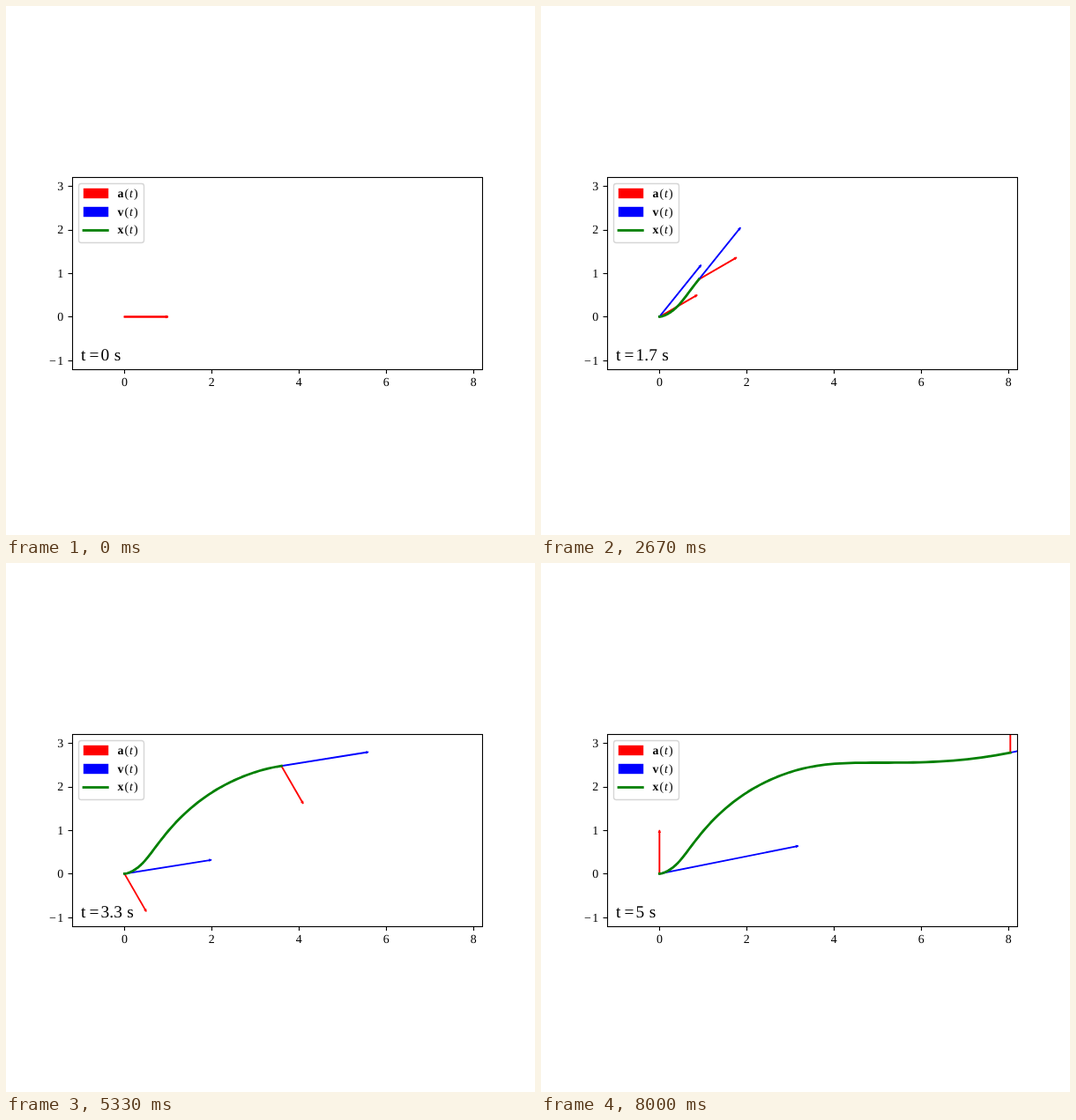
Write an HTML page that moves like this. It is 600 px wide and 600 px high and loops after 8080 ms.

```html
<!DOCTYPE html>
<html lang="en">
<head>
<meta charset="utf-8">
<title>Acceleration, velocity, position</title>
<style>
  html, body { margin: 0; width: 100%; height: 100%; overflow: hidden; background: #fff; }
  svg { display: block; width: 100vw; height: 100vh; }
  text { font: 13.9px "Liberation Serif", serif; text-rendering: geometricPrecision; }
  #clock { font-size: 19.4px; }
  .axis { fill: none; stroke: #000; stroke-width: 1.11; }
  .a, .v { stroke-width: 1.39; stroke-miterlimit: 2; }
  .a { fill: red; stroke: red; }
  .v { fill: blue; stroke: blue; }
  .x { fill: none; stroke: green; stroke-width: 2.78; stroke-linecap: square; stroke-linejoin: round; }
  .end { text-anchor: end; }
  .mid { text-anchor: middle; }
  .b { font-weight: bold; }
  .i { font-style: italic; }
</style>
</head>
<body>
<svg viewBox="0 0 600 600">
  <clipPath id="area"><rect x="75" y="194.17" width="465" height="217.66"/></clipPath>
  <g clip-path="url(#area)">
    <path id="a0" class="a"/><path id="v0" class="v"/>
    <path id="a1" class="a"/><path id="v1" class="v"/>
    <path id="trail" class="x"/>
  </g>
  <g id="axes"><rect class="axis" x="75.5" y="194.5" width="465" height="218"/></g>
  <text id="clock" y="401.9"><tspan x="85">t</tspan><tspan x="94.6">=</tspan><tspan id="secs" x="107.6">0</tspan><tspan dx="5.5">s</tspan></text>
  <g id="legend">
    <rect x="82.5" y="201.5" width="74" height="67" rx="2.78" fill="#fff" fill-opacity=".8" stroke="#ccc" stroke-opacity=".8" stroke-width="1.39"/>
    <rect class="a" x="88.5" y="207.5" width="27" height="10"/>
    <rect class="v" x="88.5" y="228.5" width="27" height="10"/>
    <path class="x" d="M88 254.5H115.3"/>
  </g>
</svg>
<script>
const $ = id => document.getElementById(id);
const UNIT = 465 / 9.4, STEPS = 96, LOOP = 8080, Q = 2 / Math.PI;
const px = x => 75 + (x + 1.2) * UNIT;
const py = y => 411.83 - (y + 1.2) * UNIT;
const pt = ([x, y]) => px(x).toFixed(2) + ' ' + py(y).toFixed(2);

// a = (|cos|, sin) of a quarter turn per second; v and x are its exact integrals
const accel = t => [Math.abs(Math.cos(t / Q)), Math.sin(t / Q)];

function speed(t) {
  const turns = Math.floor((t + 1) / 2);
  return [Q * (2 * turns + (-1) ** turns * Math.sin(t / Q)), Q * (1 - Math.cos(t / Q))];
}

function place(t) {
  const n = Math.floor(t), f = t - n, s = Math.sin(f / Q), c = Math.cos(f / Q);
  const start = Q * n * n / 2 + (n % 2 ? Q * Q - Q / 2 : 0);
  const part = n % 2 ? f * Q - Q * Q * s : Q * Q * (1 - c);
  return [start + Q * n * f + part, Q * (t - Q * Math.sin(t / Q))];
}

function arrow([x, y], [dx, dy]) {
  const len = Math.hypot(dx, dy);
  if (len < 1e-6) return '';
  const ux = dx / len, uy = dy / len, neck = len - 0.045;
  const outline = [[0, .005], [neck, .005], [neck, .015], [len, 0], [neck, -.015], [neck, -.005], [0, -.005]];
  return 'M' + outline.map(([l, w]) => pt([x + l * ux - w * uy, y + l * uy + w * ux])).join('L') + 'Z';
}

// one decimal, ties to even, no trailing zero
function label(t) {
  const n = t * 10;
  return String((n % 1 === .5 ? 2 * Math.round(n / 2) : Math.round(n)) / 10);
}

function add(parent, markup) { $(parent).insertAdjacentHTML('beforeend', markup); }

for (let n = 0; n <= 8; n += 2) {
  const x = px(n), tick = Math.round(x) + .5;
  add('axes', `<path class="axis" d="M${tick} 412.5V417"/><text class="mid" x="${x}" y="431.3">${n}</text>`);
}
for (let n = -1; n <= 3; n++) {
  const y = py(n), tick = Math.round(y) + .5;
  add('axes', `<path class="axis" d="M75.5 ${tick}H70.5"/><text class="end" x="65.2" y="${y + 4.6}">${Math.abs(n)}</text>`);
  if (n < 0) add('axes', `<text class="mid" x="52.9" y="${y + 4.6}">−</text>`);
}
['a', 'v', 'x'].forEach((name, i) => add('legend',
  `<text y="${217 + 20.7 * i}"><tspan class="b" x="126.4">${name}</tspan><tspan x="134.6">(</tspan>` +
  `<tspan class="i" x="140">t</tspan><tspan x="145">)</tspan></text>`));

const path = Array.from({ length: STEPS + 1 }, (_, k) => pt(place(k * 5 / STEPS)));
let shown = -1;

function draw(k) {
  const t = k * 5 / STEPS, a = accel(t), v = speed(t), x = place(t);
  $('a0').setAttribute('d', arrow([0, 0], a));
  $('v0').setAttribute('d', arrow([0, 0], v));
  $('a1').setAttribute('d', arrow(x, a));
  $('v1').setAttribute('d', arrow(x, v));
  $('trail').setAttribute('d', k ? 'M' + path.slice(0, k + 1).join('L') : '');
  $('secs').textContent = label(t);
}

const begin = performance.now();
function tick() {
  const ms = (performance.now() - begin) % LOOP;
  // steps of 1/12 s, held to whole hundredths
  const k = Math.min(STEPS, Math.floor((Math.floor(ms / 10) * 10 + 5) * 12 / 1000));
  if (k !== shown) draw(shown = k);
  requestAnimationFrame(tick);
}
tick();
</script>
</body>
</html>
```
